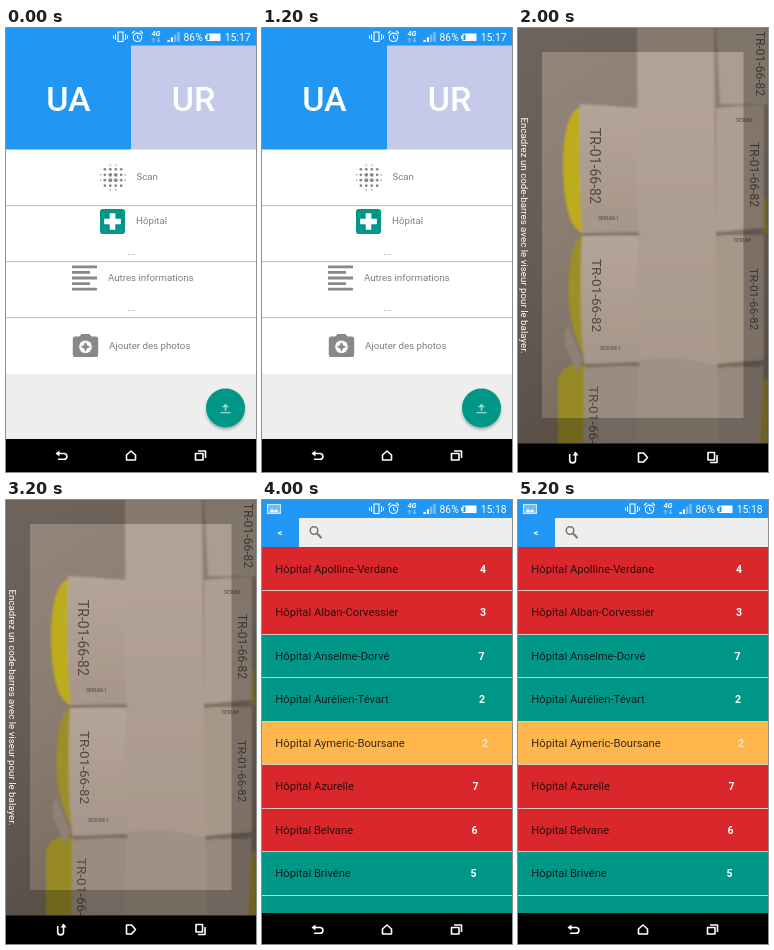
An HTML page that plays this animation: 250 by 444 pixels, repeating every 6 s.

```html
<!DOCTYPE html>
<html lang="fr">
<head>
<meta charset="utf-8">
<title>Application mobile</title>
<style>
  html, body { margin: 0; width: 100%; height: 100%; overflow: hidden; background: #000; }
  svg { display: block; width: 100%; height: 100%; font-family: Roboto, Arial, sans-serif; }
  .scene { opacity: 0; }
</style>
</head>
<body>
<svg id="stage" viewBox="0 0 250 444">
  <defs>
    <linearGradient id="desk" x1="0" y1="0" x2=".4" y2="1">
      <stop offset="0" stop-color="#95877b"/>
      <stop offset=".5" stop-color="#8a7c70"/>
      <stop offset="1" stop-color="#75685d"/>
    </linearGradient>
    <linearGradient id="paper" x1="0" y1="0" x2="0" y2="1">
      <stop offset="0" stop-color="#b5a598"/>
      <stop offset="1" stop-color="#a69689"/>
    </linearGradient>
    <filter id="soft"><feGaussianBlur stdDeviation=".8"/></filter>
    <filter id="shade" x="-30%" y="-30%" width="160%" height="170%">
      <feDropShadow dx="0" dy="2" stdDeviation="1.8" flood-opacity=".3"/>
    </filter>
  </defs>
</svg>
<script>
const BLUE = '#2196f3', TEAL = '#009688', RED = '#d9272c', AMBER = '#ffb74d';
const GREY = '#757575', SOFT = '#8b8787';

const rect = (x, y, w, h, fill, more = '') =>
  `<rect x="${x}" y="${y}" width="${w}" height="${h}" fill="${fill}" ${more}/>`;
const path = (d, fill, more = '') => `<path d="${d}" fill="${fill}" ${more}/>`;
const text = (x, y, size, fill, str, more = '') =>
  `<text x="${x}" y="${y}" font-size="${size}" fill="${fill}" ${more}>${str}</text>`;
const down = (x, y, size, fill, str) =>
  text(0, 0, size, fill, str, `transform="translate(${x} ${y}) rotate(90)"`);
// Places a 24-unit icon by its centre
const icon = (cx, cy, scale, body) =>
  `<g transform="translate(${cx} ${cy}) scale(${scale}) translate(-12 -12)">${body}</g>`;
const middle = 'text-anchor="middle"';

function statusBar(time) {
  const line = 'stroke="#fff" stroke-width="1.1"';
  let s = rect(0, 0, 250, 18, BLUE);
  s += rect(112, 4, 5, 9.5, 'none', line);
  s += path('M109.500 6v6M107.500 7.500v3M119.500 6v6M121.500 7.500v3', 'none', line);
  s += `<circle cx="131.500" cy="9.300" r="4.200" fill="none" ${line}/>`;
  s += path('M131.500 7v2.500l2 1.200M126 5.500l2.800-2.500M137 5.500l-2.800-2.500', 'none', line);
  s += text(150, 7.500, 7.500, '#fff', '4G', middle + ' font-weight="700" font-style="italic"');
  s += path('M147.500 9.500l2 2h-1.300v3h-1.400v-3h-1.300zM152.500 14.500l-2-2h1.300v-3h1.400v3h1.300z', '#7fc1f8');
  for (let i = 0; i < 4; i++)
    s += rect(161.500 + i * 3.300, 12 - i * 2.700, 2.200, 2 + i * 2.700, '#fff', i > 1 ? 'opacity=".4"' : '');
  s += text(177.500, 12.600, 10.400, '#fff', '86%');
  s += rect(200.500, 5.500, 14, 7.500, '#fff', 'rx=".6"') + rect(199, 7.500, 1.500, 3.500, '#fff');
  s += rect(201.500, 6.500, 2, 5.500, BLUE);
  return s + text(218.700, 12.600, 10.400, '#fff', time);
}

function navBar(top, cy, turn) {
  const line = 'stroke="#fff" stroke-width="1.600" stroke-linejoin="round"';
  const shapes = [
    path('M-5 -2H2.500a2.900 2.900 0 0 1 0 5.800H-3.500', 'none', line) + path('M-6 -2L-2 -5V1Z', '#fff'),
    path('M-4.500 4.500V-.5L0 -4.500L4.500 -.5V4.500Z', 'none', line),
    path('M-5 -2H2.500V4.500H-5ZM-2.500 -4.500H5V2.500', 'none', line)
  ];
  return rect(0, top, 250, 444 - top, '#000') + shapes.map((s, i) =>
    `<g transform="translate(${55.5 + i * 69.5} ${cy}) rotate(${turn})">${s}</g>`).join('');
}

function blurDots() {
  const at = [3, 6, 10, 14, 18, 21];
  let s = '';
  for (const x of at) for (const y of at) {
    const far = Math.max(Math.abs(x - 12), Math.abs(y - 12));
    const near = Math.min(Math.abs(x - 12), Math.abs(y - 12));
    if (far === 9 && near > 2) continue;
    s += `<circle cx="${x}" cy="${y}" r="${far === 9 ? .5 : far === 6 ? 1 : 1.4}" fill="${SOFT}"/>`;
  }
  return s;
}

function menu() {
  const label = (x, y, str) => text(x, y + 3.200, 9.700, '#7e7e7e', str);
  let s = rect(0, 0, 250, 444, '#fff') + statusBar('15:17');
  s += rect(0, 17.500, 125, 104, BLUE) + rect(125, 17.500, 125, 104, '#c5cae9');
  s += text(62.500, 82.500, 34, '#fff', 'UA', middle + ' font-weight="500"');
  s += text(187.500, 82.500, 34, '#fff', 'UR', middle + ' font-weight="500"');
  for (const y of [177, 233, 289]) s += rect(0, y, 250, 1.200, '#c2c2c2');
  s += icon(107, 149.500, 1.360, blurDots()) + label(130.500, 149, 'Scan');
  s += icon(106.500, 193.500, 1.390,
    rect(3, 3, 18, 18, TEAL, 'rx="2"') + path('M18 14h-4v4h-4v-4H6v-4h4V6h4v4h4z', '#fff'));
  s += label(130, 193, 'Hôpital') + text(125, 227, 9.700, SOFT, '...', middle);
  s += icon(78.500, 250, 1.390,
    path('M3 3h18v2H3zM3 7h13v2H3zM3 11h18v2H3zM3 15h13v2H3zM3 19h18v2H3z', SOFT));
  s += label(102, 249.500, 'Autres informations') + text(125, 283, 9.700, SOFT, '...', middle);
  s += icon(79.500, 317.500, 1.270, path('M9 3L7.170 5H4a2 2 0 0 0-2 2v12a2 2 0 0 0 2 2h16a2 2 0 0 0 2-2V7a2 2 0 0 0-2-2h-3.170L15 3z', SOFT)
    + '<circle cx="12" cy="13" r="5" fill="#fff"/>'
    + path('M12 9l1.250 2.750L16 13l-2.750 1.250L12 17l-1.250-2.750L8 13l2.750-1.250z', SOFT));
  s += label(103, 317.300, 'Ajouter des photos');
  s += rect(0, 346, 250, 66, '#eee');
  s += `<circle cx="219.500" cy="380" r="19.500" fill="${TEAL}" filter="url(#shade)"/>`;
  s += icon(219.500, 380, .72, path('M11 16h2v-5h4l-5-5-5 5h4zM5 17.500h14v1.800H5z', '#a3d5cf'));
  return s + navBar(411, 427.500, 0);
}

function scanner() {
  const ink = '#51463f', code = 'TR-01-66-82';
  let s = rect(0, 0, 250, 416, 'url(#desk)');
  s += '<g filter="url(#soft)">';
  // Yellow tube caps behind the labels
  s += path('M66 78Q45 80 45 140Q46 200 66 206Z', '#bdac1b');
  s += path('M66 206Q51 214 50 262Q51 300 66 328Z', '#9d8f25');
  s += path('M40 352Q46 332 68 338V416H40Z', '#978a28');
  s += path('M50 296Q56 312 64 330L60 344Q48 326 46 306Z', '#8f8174');
  s += path('M244 170H250V206H244ZM242 352H250V416H238Z', '#94872d');
  // Label sheets
  s += path('M62 76L122 80V204L64 205Q60 140 62 76Z', 'url(#paper)');
  s += path('M64 208L122 206V334L66 336Q60 270 64 208Z', 'url(#paper)');
  s += path('M66 340L122 336V416H66Z', '#9b8c80');
  s += path('M198 0H250V76H202Z', '#ad9d90');
  s += path('M198 80L246 76V200L198 204Z', '#ae9e91');
  s += path('M198 208L246 204V332L198 336Z', '#a79789');
  s += path('M198 340L246 336L242 416H198Z', '#988a7d');
  s += path('M119 0H196L200 416H121Z', 'url(#paper)');
  s += path('M121 332Q160 326 199 338V416H121Z', '#a09184');
  s += path('M62 206.500H122M64 337H122M198 206H247M199 338H245', 'none', 'stroke="#7b6d62" stroke-width="2"');
  s += '</g>';
  s += down(71.500, 100, 14, ink, code) + down(73.500, 231, 13.500, ink, code) + down(70.500, 358, 13.500, ink, code);
  s += down(232, 114, 12, ink, code) + down(237.500, 3, 12, ink, code) + down(232, 240, 11.500, ink, code);
  s += text(80, 192, 5, ink, 'SERUM-1') + text(82, 322, 5, ink, 'SERUM-1');
  s += text(218, 94, 5, ink, 'SERUM') + text(216, 214, 5, ink, 'SERUM');
  s += path('M0 0H250V416H0ZM24 24V390H225.500V24Z', '#000', 'fill-rule="evenodd" opacity=".26"');
  s += down(2.500, 89.500, 9.750, '#fff', 'Encadrez un code-barres avec le viseur pour le balayer.');
  return s + navBar(415.500, 429.500, 90);
}

function hospitals() {
  const rows = [
    ['Apolline-Verdane', 4, 221, RED], ['Alban-Corvessier', 3, 221, RED],
    ['Anselme-Dorvé', 7, 219.500, TEAL], ['Aurélien-Tévart', 2, 220, TEAL],
    ['Aymeric-Boursane', 2, 223, AMBER], ['Azurelle', 7, 213.500, RED],
    ['Belvane', 6, 212.500, RED], ['Brivêne', 5, 211.500, TEAL],
    ['Butavel - Claire Dorvane', '', 211, TEAL]
  ];
  const step = 43.450;
  let s = statusBar('15:18');
  s += rect(5.500, 4.500, 13, 9, '#6fb9f7', 'stroke="#cfe8fd" stroke-width="1.100"');
  s += path('M7 12.500l3-4 2.200 2.500 2-2 3 3.500z', '#e6f3fe');
  s += rect(0, 18, 37, 29.500, BLUE) + rect(37, 18, 213, 29.500, '#eee');
  s += text(18, 35.500, 9.500, '#fff', '&lt;', middle + ' font-weight="700"');
  s += '<circle cx="52" cy="30.500" r="3.800" fill="none" stroke="#757575" stroke-width="1.500"/>';
  s += path('M54.800 33.300L59.500 38', 'none', `stroke="${GREY}" stroke-width="2"`);
  rows.forEach(([name, count, x, fill], i) => {
    const y = Math.round(47 + i * step);
    s += rect(0, y, 250, 44, fill);
    if (i) s += rect(0, y, 250, 1, '#d8cbc2');
    s += text(13.300, y + 25.600, 11.200, '#000', 'Hôpital ' + name, 'opacity=".78"');
    s += text(x, y + 25.600, 10.600, fill === AMBER ? '#ffe3b8' : '#fff', count, middle + ' font-weight="700"');
  });
  return s + navBar(413, 429.500, 0);
}

const stage = document.getElementById('stage');
const scenes = [menu, scanner, hospitals];
stage.insertAdjacentHTML('beforeend', scenes.map(draw => `<g class="scene">${draw()}</g>`).join(''));

// Each scene holds for one third of the loop
stage.querySelectorAll('.scene').forEach((el, i) => {
  const frames = [0, 1, 2, 3].map(k => ({
    offset: k / 3, opacity: Math.min(k, 2) === i ? 1 : 0, easing: 'step-end'
  }));
  el.animate(frames, { duration: 6000, iterations: Infinity });
});
</script>
</body>
</html>
```
